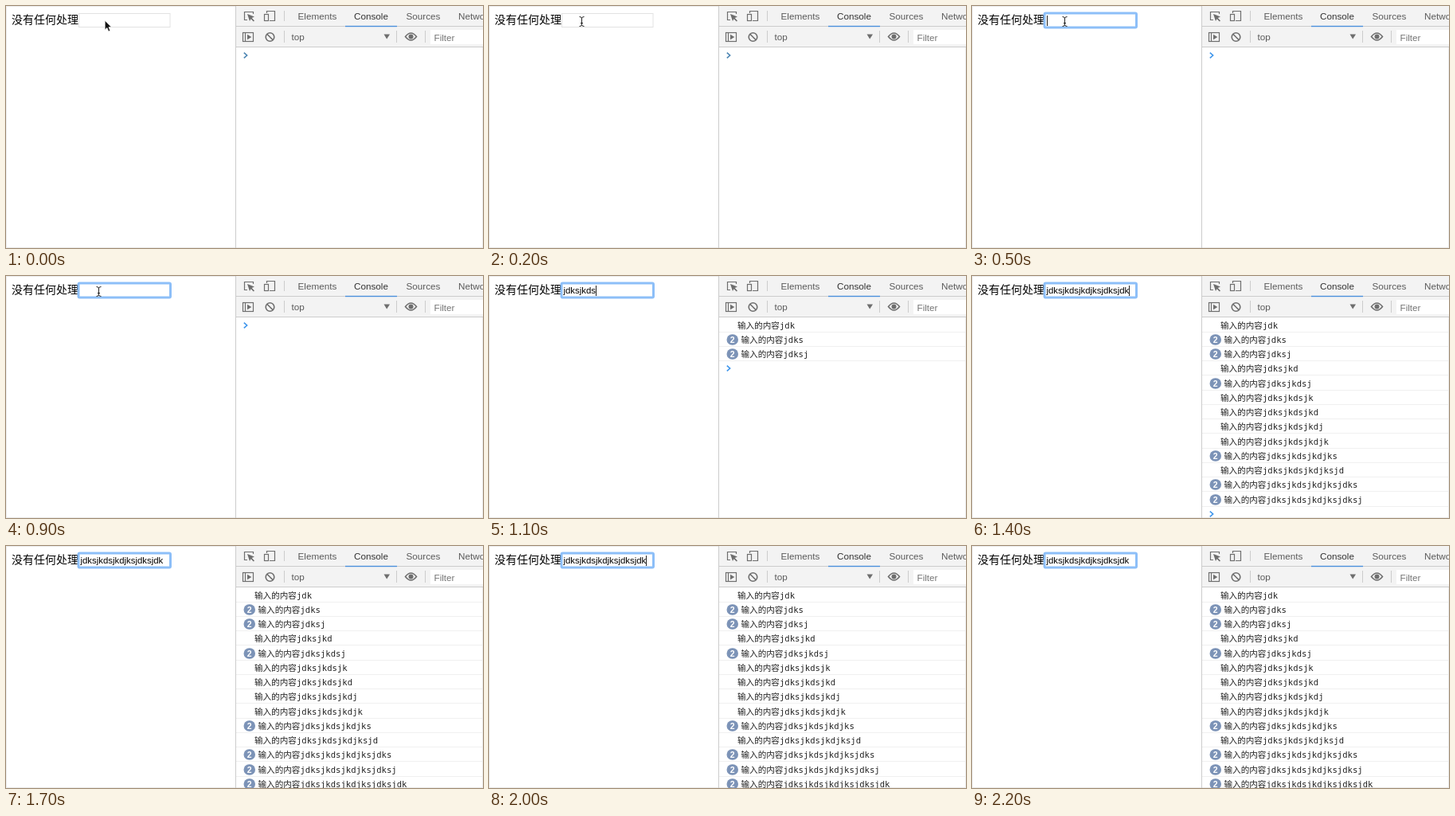
These frames come from a looping animation (599x304 px, 2.3 s). An HTML page:

```html
<!DOCTYPE html>
<html lang="zh">
<head>
<meta charset="utf-8">
<title>Input logging</title>
<style>
  html, body { margin: 0; width: 100%; height: 100%; overflow: hidden; background: #fff; }
  svg { display: block; width: 599px; height: 304px; }
  text { white-space: pre; }
  .label { font: 14px "Noto Sans CJK SC", "Noto Sans CJK", sans-serif; fill: #000; }
  .typed { font: 11.4px "Liberation Sans", sans-serif; fill: #000; }
  .ui { font: 11.7px "Liberation Sans", sans-serif; fill: #5a5a5a; }
  .ui .active { fill: #333; }
  .ui .hint { fill: #757575; }
  .log { font: 10.6px "DejaVu Sans Mono", "Noto Sans CJK SC", "Noto Sans CJK", monospace; fill: #222; }
  .count { font: bold 10.5px "Liberation Sans", sans-serif; fill: #fff; text-anchor: middle; }
  .icon { fill: none; stroke: #6e6e6e; stroke-width: 1.2; }
  .bold { stroke-width: 1.6; }
  .solid { fill: #6e6e6e; }
  .rule { stroke: #ccc; }
</style>
</head>
<body>
<svg viewBox="0 0 599 304">
  <rect width="599" height="304" fill="#fff"/>
  <path d="M.5 0V304M0 .5H288M0 303.5H599M598.5 52V304" stroke="#ebebeb"/>

  <text class="label" x="7" y="22">没有任何处理</text>
  <rect x="91.5" y="9.5" width="114.5" height="17" fill="#fff" stroke="#e2e2e2"/>
  <rect id="ring" x="91" y="9" width="115.5" height="18" rx="1.5" fill="none" stroke="#8dbff8" stroke-width="3"/>
  <text id="typed" class="typed" x="93.5" y="22"></text>
  <path id="caret" d="M0 12V25" stroke="#222"/>

  <rect x="289" width="310" height="51" fill="#f3f3f3"/>
  <path class="rule" d="M288.5 0V304M289 25.5H599M289 51.5H599M349.5 6V19M349.5 31V46M490.5 31V46M526.5 31V46"/>
  <rect x="426" y="24.8" width="65" height="1.4" fill="#4a8fdc"/>
  <rect x="533" y="30" width="66" height="18" fill="#fff"/>
  <g class="ui">
    <text x="366.5" y="17">Elements</text>
    <text x="437" y="17" class="active">Console</text>
    <text x="502.5" y="17">Sources</text>
    <text x="568" y="17">Network</text>
    <text x="358.5" y="43">top</text>
    <text x="537.5" y="44" class="hint">Filter</text>
  </g>
  <g class="icon">
    <path d="M303 17.5H299.5V7.5H310.5V10"/>
    <path d="M327.5 9V6.5H337.5V18.5H331"/>
    <rect x="324.5" y="10.5" width="5" height="8"/>
    <rect x="297.5" y="33.5" width="13" height="11"/>
    <path d="M300.5 34V44"/>
    <g class="bold">
      <circle cx="331.5" cy="39" r="5.3"/>
      <path d="M327.8 35.3L335.2 42.7"/>
      <path d="M501.5 38.5Q508.5 29.5 515.5 38.5Q508.5 47.5 501.5 38.5Z"/>
    </g>
  </g>
  <g class="solid">
    <path d="M303 10L312 13.5L308.7 15L312 18.4L310.8 19.5L307.5 16.2L306 19Z"/>
    <path d="M303 35.7L308.3 39L303 42.3Z"/>
    <path d="M474.5 35.5H482L478.2 41.5Z"/>
    <circle cx="508.5" cy="38.5" r="3"/>
  </g>

  <g id="rows"></g>
  <path id="prompt" d="M298.8 -3.3L302.6 0L298.8 3.3" fill="none" stroke-width="1.6"/>

  <path id="arrow" d="M0 0V11.6L2.7 9.1L4.6 13.6L6.6 12.7L4.8 8.3H8.2Z" fill="#111" stroke="#fff" stroke-width=".7"/>
  <path id="beam" d="M113.5 13.5Q116.5 13.5 116.5 15.5Q116.5 13.5 119.5 13.5M116.5 15V24M113.5 25.5Q116.5 25.5 116.5 23.5Q116.5 25.5 119.5 25.5M115 21.5H118" fill="none" stroke="#222"/>
</svg>
<script>
const LOOP = 2300, ROW = 18.25, FIRST = 62;
const WORD = "jdksjkdsjkdjksjdksjdk";
// [letters logged, times repeated]
const LOGS = [[3, 1], [4, 2], [5, 2], [7, 1], [9, 2], [10, 1], [11, 1],
              [12, 1], [13, 1], [14, 2], [16, 1], [18, 2], [19, 2], [21, 2]];
// [start ms, letters typed, rows logged, caret shown]
const STEPS = [
  [0, 0, 0, 0], [400, 0, 0, 1], [900, 0, 0, 0],
  [1000, 4, 1, 1], [1100, 8, 3, 1], [1200, 13, 7, 1], [1300, 17, 10, 1],
  [1400, 21, 13, 1], [1500, 21, 14, 1], [1700, 21, 14, 0],
  [1900, 21, 14, 1], [2100, 21, 14, 0]
];
const ARROW = [[0, 124.2, 18.3], [100, 120, 17]];
const FOCUS = 400, BEAM_IN = 200, BEAM_OUT = 1000;

const $ = id => document.getElementById(id);
const show = (node, on) => node.setAttribute("visibility", on ? "visible" : "hidden");
const at = (table, t) => table.findLast(step => step[0] <= t);
const rowY = i => Math.floor(FIRST + ROW * i);

$("rows").innerHTML = LOGS.map(([length, times], i) => {
  const y = rowY(i);
  const badge = times > 1
    ? `<rect x="298.5" y="${y - 6.7}" width="14.5" height="13.4" rx="6.7" fill="#7c93b7"/>
       <text class="count" x="305.7" y="${y + 3.8}">${times}</text>` : "";
  return `<g><path d="M289 ${y + 8.5}H598" stroke="#f0f0f0"/>${badge}
    <text class="log" x="${times > 1 ? 316.5 : 312}" y="${y + 4}">输入的内容${WORD.slice(0, length)}</text></g>`;
}).join("");
const rows = [...$("rows").children];

function draw(t) {
  const [, letters, logged, caret] = at(STEPS, t);
  const [, x, y] = at(ARROW, t);
  const focused = t >= FOCUS;

  $("typed").textContent = WORD.slice(0, letters);
  const end = letters ? $("typed").getComputedTextLength() : 0;
  $("caret").setAttribute("transform", `translate(${Math.round(93.5 + end) + .5} 0)`);
  show($("caret"), caret);
  show($("ring"), focused);

  rows.forEach((row, i) => show(row, i < logged));
  $("prompt").setAttribute("transform", `translate(0 ${rowY(logged)})`);
  $("prompt").setAttribute("stroke", focused ? "#3d95ec" : "#4c85b3");

  show($("arrow"), t < BEAM_IN);
  $("arrow").setAttribute("transform", `translate(${x} ${y})`);
  show($("beam"), t >= BEAM_IN && t < BEAM_OUT);
}

const start = performance.now();
function tick(now) {
  draw(Math.max(0, now - start) % LOOP);
  requestAnimationFrame(tick);
}
draw(0);
requestAnimationFrame(tick);
</script>
</body>
</html>
```
